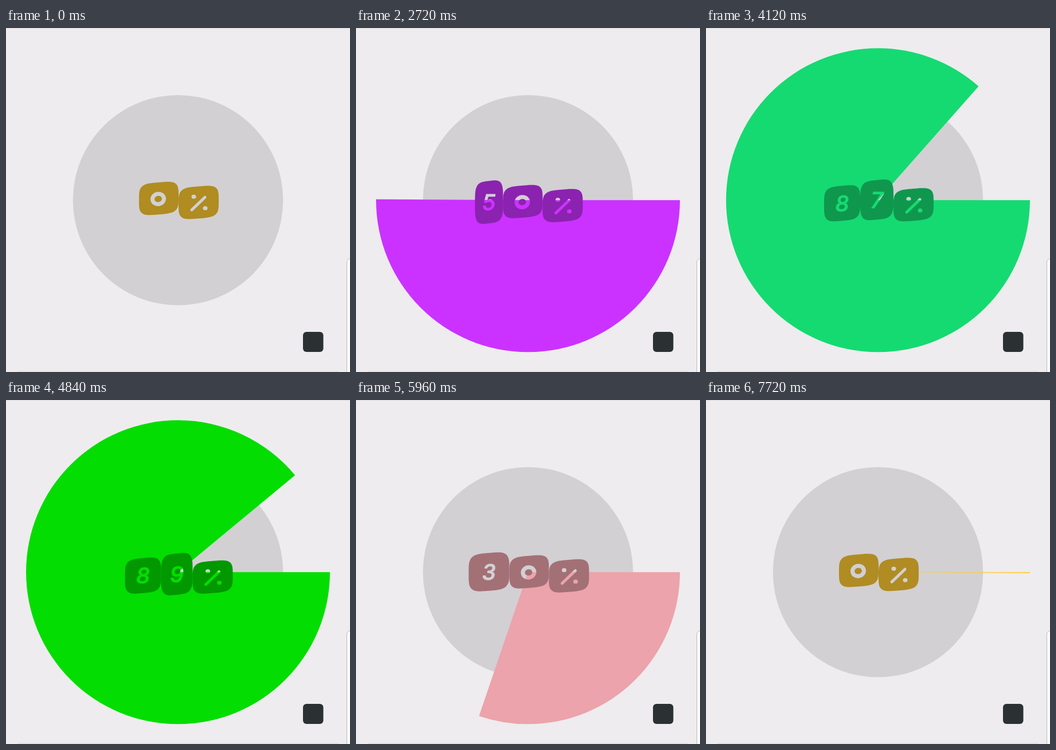
These frames come from a looping animation (600 by 600 pixels, 7760 ms). An HTML page with a canvas:

```html
<!DOCTYPE html>
<html>
<head>
<meta charset="utf-8">
<style>
  html, body { margin: 0; width: 100%; height: 100%; overflow: hidden; background: #eeecee; }
  canvas { display: block; }
</style>
</head>
<body>
<canvas id="stage" width="600" height="600"></canvas>
<script>
const LOOP = 7760, DURATION = 500, TURN = Math.PI * 2;
const CENTER = { x: 300, y: 300.3 };
const ctx = document.getElementById('stage').getContext('2d');
const layer = document.createElement('canvas');
layer.width = layer.height = 600;
const ink = layer.getContext('2d');

// [start time, percentage reached]
const steps = [[467, 27], [1566, 50], [2699, 74], [3765, 89], [4838, 23], [5737, 41], [7239, 0]];
const yellow = [255, 203, 48], purple = [203, 48, 255], blue = [48, 203, 255], green = [0, 221, 0];
const colorFor = v => v < 25 ? yellow : v <= 50 ? purple : v <= 75 ? blue : green;

// Tile width, then top and bottom relative to the label's base line
const tiles = {
  0: [69, -65, -7], 1: [49, -71, 0], 2: [68, -67, 2], 3: [71, -70, -2], 4: [54, -69, 1], 5: [49, -73, 3],
  6: [55, -70, 0], 7: [58, -73, -2], 8: [63, -63, 0], 9: [55, -71, 3], '%': [70, -58, 0]
};

const easeInOut = t => t < .5 ? 2 * t * t : 1 - 2 * (1 - t) ** 2;
const rgb = c => `rgb(${c.map(Math.round)})`;
// Gamma-corrected colour blend
const blend = (a, b, t) => a.map((v, i) => (v ** 2.2 * (1 - t) + b[i] ** 2.2 * t) ** (1 / 2.2));

function stateAt(time) {
  let value = 0, color = yellow;
  for (const [start, target] of steps) {
    if (time < start) break;
    const p = easeInOut(Math.min(1, (time - start) / DURATION));
    color = blend(color, colorFor(target), p);
    value += (target - value) * p;
  }
  return { value, color };
}

// A superellipse around the origin, leaning up to the right
function fillTile(width, height, lean = 3) {
  const squash = v => Math.sign(v) * Math.sqrt(Math.abs(v));
  ink.beginPath();
  for (let a = 0; a < TURN; a += TURN / 90) {
    const u = squash(Math.cos(a)), v = squash(Math.sin(a));
    ink.lineTo(u * width / 2, v * (height / 2 - lean / 3) - u * lean);
  }
  ink.fill();
}

function strokePath(weight, path) {
  ink.lineWidth = weight;
  ink.beginPath();
  path();
  ink.stroke();
}

// Cuts a character out of the tile around the origin
function cutCharacter(char) {
  if (char === '0') {
    strokePath(7, () => ink.ellipse(-1, 1, 10, 9, -.2, 0, TURN));
  } else if (char === '%') {
    strokePath(5, () => { ink.moveTo(-12, 13); ink.lineTo(11, -9); });
    for (const side of [-1, 1]) strokePath(7, () => {
      ink.moveTo(side * 10 + 1, side * 10);
      ink.lineTo(side * 10 + 2, side * 10);
    });
  } else {
    ink.lineWidth = 1.2;
    ink.fillText(char, 0, 14);
    ink.strokeText(char, 0, 14);
  }
}

function drawLabel(text, color) {
  const chars = [...text], set = chars.map(c => tiles[c]);
  const total = set.reduce((sum, [width]) => sum + width, 0);
  const height = Math.max(...set.map(t => t[2])) - Math.min(...set.map(t => t[1]));
  let x = 301.5 - total / 2;
  const base = 300.7 + height / 2;
  ink.clearRect(0, 0, 600, 600);
  ink.fillStyle = rgb(color);
  ink.lineCap = ink.lineJoin = 'round';
  ink.textAlign = 'center';
  ink.font = 'italic 500 38px Inter, sans-serif';
  set.forEach(([width, top, bottom], i) => {
    ink.save();
    ink.translate(x + width / 2, base + (top + bottom) / 2);
    fillTile(width, bottom - top);
    ink.globalCompositeOperation = 'destination-out';
    cutCharacter(chars[i]);
    ink.restore();
    x += width;
  });
  ctx.drawImage(layer, 0, 0);
}

function box(x, y, w, h, r, fill, line) {
  ctx.beginPath();
  ctx.roundRect(x, y, w, h, r);
  ctx.fillStyle = fill;
  ctx.fill();
  if (line) { ctx.strokeStyle = line; ctx.stroke(); }
}

function sector(radius, share, fill) {
  ctx.beginPath();
  ctx.moveTo(CENTER.x, CENTER.y);
  ctx.arc(CENTER.x, CENTER.y, radius, 0, TURN * share);
  ctx.fillStyle = fill;
  ctx.fill();
}

function draw(time) {
  const { value, color } = stateAt(time);
  box(0, 0, 600, 600, 0, '#eeecee');
  box(0, 0, 600, 1, 0, '#dedcde');
  box(20, 598, 560, 2, 1, '#e2e1e2');
  box(594.5, 402.5, 40, 240, 6, '#fafafa', '#bdbdbd');
  sector(183.3, 1, '#d2d0d3');
  if (value > 0) sector(265, value / 100, rgb(color));
  drawLabel(Math.round(value) + '%', color.map(c => c * .69));
  box(518, 530, 35.5, 35, 6, '#2b3133');
}

const begin = performance.now();
function tick() {
  draw((performance.now() - begin) % LOOP);
  requestAnimationFrame(tick);
}
tick();
</script>
</body>
</html>
```
